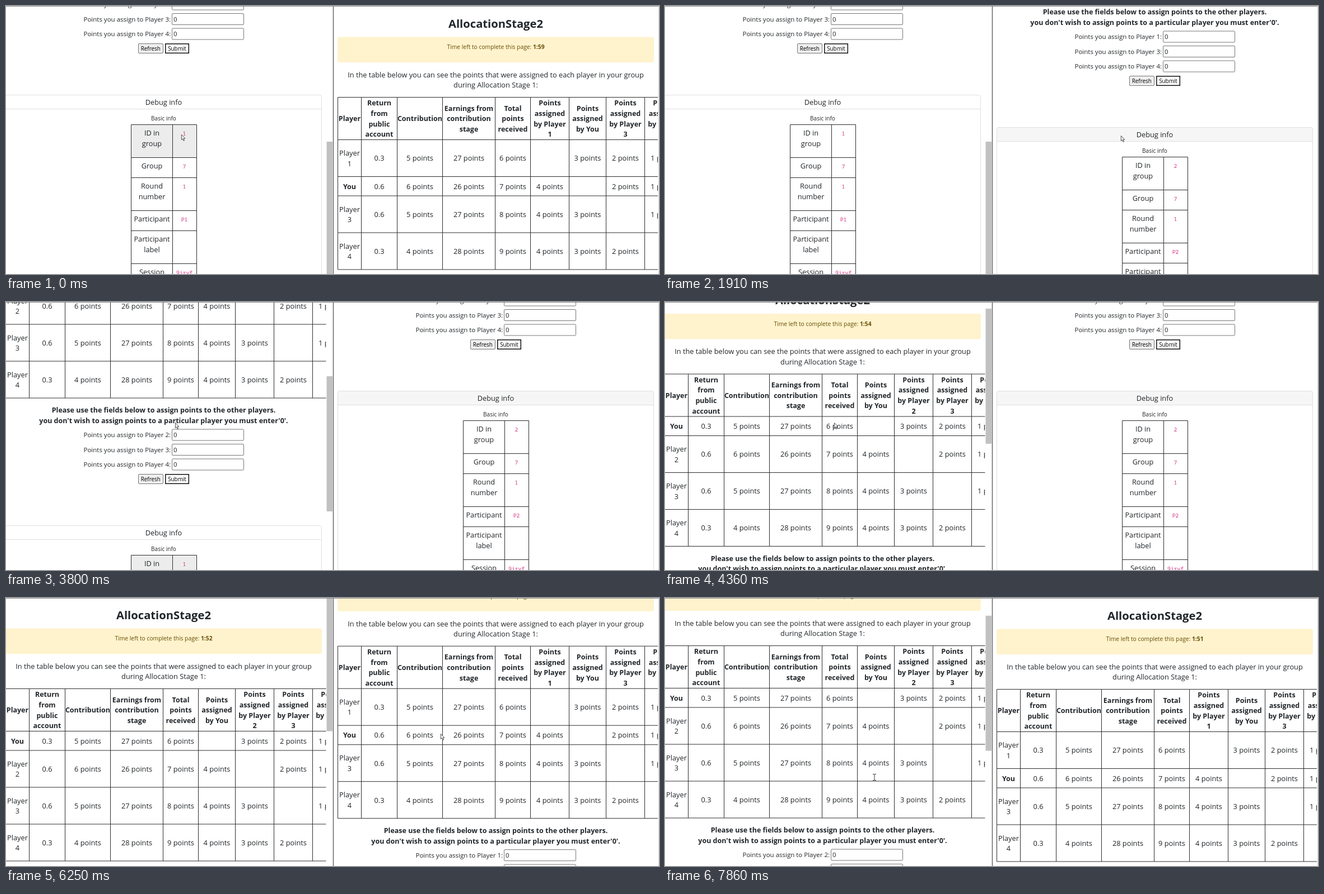
Animation, 1166 px wide and 480 px high, one loop 7.99 s. Source, as an HTML page:

```html
<!DOCTYPE html>
<html lang="en">
<head>
<meta charset="utf-8">
<title>Allocation stage</title>
<style>
  html, body { margin: 0; width: 100%; height: 100%; overflow: hidden; background: #fff; }
  svg { display: block; }
  text { font-family: "Open Sans", "Noto Sans", sans-serif; font-size: 12.76px; fill: #212529; text-anchor: middle; }
  .bold { font-size: 12.5px; font-weight: 700; }
  .title { font-size: 20.2px; font-weight: 700; }
  .timer { font-size: 10.3px; fill: #664d03; }
  .timer tspan { font-weight: 700; }
  .field { font-size: 11.5px; text-anchor: start; }
  .small { font-size: 10px; }
  .button { font-size: 9.9px; fill: #000; }
  .code { font-family: "Noto Sans Mono", "DejaVu Sans Mono", monospace; font-size: 9.7px; fill: #d63384; }
  .grid { stroke: #2e2e2e; fill: none; }
  .card { stroke: #dfdfdf; fill: none; }
  .input { stroke: #767676; fill: #fff; }
</style>
</head>
<body>
<svg id="stage" width="1166" height="480" viewBox="0 0 1166 480">
  <defs>
    <clipPath id="clipLeft"><rect width="571.5" height="480"/></clipPath>
    <clipPath id="clipRight"><rect x="587" width="577" height="480"/></clipPath>
  </defs>
</svg>
<script>
const NS = 'http://www.w3.org/2000/svg';
const stage = document.getElementById('stage');
const LOOP = 7990, STEP = 135.4;

function el(tag, attrs, parent) {
  const node = document.createElementNS(NS, tag);
  for (const k in attrs) node.setAttribute(k, attrs[k]);
  return parent.appendChild(node);
}

const SIZES = { '': 12.76, bold: 12.5, title: 20.2, timer: 10.3, field: 11.5, small: 10, button: 9.9, code: 9.7 };

// Text whose capitals are centred on y.
function label(parent, x, y, str, cls = '') {
  const node = el('text', { x, y: y + SIZES[cls] * 0.38, class: cls }, parent);
  node.textContent = str;
  return node;
}

// Several lines centred as a block on y.
function block(parent, x, y, str, cls) {
  const lines = str.split('|');
  lines.forEach((s, i) => label(parent, x, y + (i - (lines.length - 1) / 2) * 18.6, s, cls));
}

function box(parent, x, y, width, height, attrs) {
  return el('rect', { x, y, width, height, ...attrs }, parent);
}

function drawGrid(parent, xs, ys) {
  const x0 = xs[0], x1 = xs[xs.length - 1], y0 = ys[0], y1 = ys[ys.length - 1];
  const d = xs.map(x => `M${x} ${y0}V${y1}`).join('') + ys.map(y => `M${x0} ${y}H${x1}`).join('');
  el('path', { d, class: 'grid' }, parent);
}

function drawResults(g, me) {
  const players = [1, 2, 3, 4];
  const xs = [-0.5, 41.5, 105.5, 186.5, 280.5, 343.5, me === 1 ? 409.5 : 412.5, 478.5, 547.5, 616.5];
  const mid = i => (xs[i] + xs[i + 1]) / 2;
  const heads = ['Player', 'Return|from|public|account', 'Contribution', 'Earnings from|contribution|stage',
    'Total|points|received',
    ...players.map(p => 'Points|assigned|by ' + (p === me ? 'You' : `Player|${p}`))];
  heads.forEach((h, i) => block(g, mid(i), 201.5, h, 'bold'));

  const given = [5, 6, 5, 4];
  const ys = [163.5, 239.5];
  let y = 239.5;
  players.forEach(p => {
    const own = p === me, h = own ? 34.5 : 66, cy = y + h / 2;
    block(g, mid(0), cy, own ? 'You' : `Player|${p}`, own ? 'bold' : '');
    const spent = given[p - 1];
    const cells = [p % 3 === 1 ? '0.3' : '0.6', `${spent} points`, `${32 - spent} points`, `${5 + p} points`,
      ...players.map(q => q === p ? '' : `${5 - q} points`)];
    cells.forEach((c, i) => label(g, mid(i + 1), cy, c));
    ys.push(y += h);
  });
  drawGrid(g, xs, ys);
}

function drawForm(g, me) {
  label(g, 281.5, 493.5, 'Please use the fields below to assign points to the other players.', 'bold');
  label(g, 281.5, 512.2, "you don't wish to assign points to a particular player you must enter'0'.", 'bold');
  [1, 2, 3, 4].filter(p => p !== me).forEach((p, i) => {
    const y = 538 + i * 26.5;
    label(g, 138.5, y, `Points you assign to Player ${p}:`, 'field');
    box(g, 296.5, y - 10, 128, 20, { class: 'input', rx: 1.5 });
    label(g, 299, y, '0', 'field');
  });
  box(g, 236.5, 608.5, 44, 17, { fill: '#efefef', stroke: '#767676', rx: 1.5 });
  label(g, 258.3, 617, 'Refresh', 'button');
  box(g, 284.8, 608.8, 41.5, 16.5, { fill: '#fff', stroke: '#111', 'stroke-width': 1.5 });
  label(g, 305.5, 617, 'Submit', 'button');
}

function drawDebug(g, me) {
  const head = box(g, -0.5, 700.5, 564, 25, { fill: '#fff' });
  box(g, -0.5, 700.5, 564, 700, { class: 'card', rx: 3 });
  el('path', { d: 'M-.5 725.5H563.5', class: 'card' }, g);
  label(g, 281.5, 713, 'Debug info');
  label(g, 281.5, 742, 'Basic info', 'small');

  const hover = box(g, 223.5, 753.5, 116.5, 59, { fill: '#ececec' });
  const rows = [['ID in|group', me], ['Group', 7], ['Round|number', 1], ['Participant', 'P' + me],
    ['Participant|label', ''], ['Session', '9jrvf']];
  const ys = [753.5];
  let y = 753.5;
  rows.forEach(([name, value]) => {
    const lines = name.split('|');
    lines.forEach((s, i) => label(g, 260.5, y + 14.8 + i * 18.6, s));
    label(g, 318.5, y + 15.8, value, 'code');
    ys.push(y += lines.length > 1 ? 59 : 36);
  });
  drawGrid(g, [223.5, 297.5, 340.5], ys);
  return { head, hover };
}

function makePanel(me, dx, clip) {
  const outer = el('g', { 'clip-path': `url(#${clip})` }, stage);
  const g = el('g', {}, outer);
  label(g, 281.5, 31, 'AllocationStage2', 'title');
  box(g, -1, 55.5, 565, 45.5, { fill: '#fff3cd', rx: 3 });
  const timer = label(g, 281.5, 73.3, 'Time left to complete this page: ', 'timer');
  const clock = el('tspan', {}, timer);
  block(g, 281.5, 132.3, 'In the table below you can see the points that were assigned to each player in your group|during Allocation Stage 1:');
  drawResults(g, me);
  drawForm(g, me);
  const { head, hover } = drawDebug(g, me);
  return { g, dx, clock, head, hover };
}

const left = makePanel(1, 0, 'clipLeft');
const right = makePanel(2, 593, 'clipRight');

// Window frame and scrollbar
const thumb = box(stage, 572.5, 0, 10.5, 242, { fill: '#c1c1c1' });
box(stage, 583, 0, 3, 480, { fill: '#d4d4d4' });
box(stage, 584, 0, 1, 480, { fill: '#6c6c6c' });
box(stage, 0, 0, 1166, 1, { fill: '#8a8a8a' });
box(stage, 1165, 0, 1, 480, { fill: '#d8d8d8' });

const arrow = el('path', {
  d: 'M.4 .5V9.6L2.5 7.7L4 11.4L5.5 10.8L4 7.2H6.8Z',
  fill: '#fff', stroke: '#222', 'stroke-width': 0.8
}, stage);
const beam = el('path', { d: 'M-3 -5.5H-.8L0 -5L.8 -5.5H3M0 -5V5M-3 5.5H-.8L0 5L.8 5.5H3', fill: 'none', stroke: '#333' }, stage);

// Keys: [step, value, ...]
const leftScroll = [[0, 541], [24, 541], [28, 300], [32, 34.5], [33, 1], [54, 1], [58, 78]];
const rightScroll = [[0, 0], [4, 0], [9, 309], [11, 309], [15, 541], [36, 541], [42, 77.3], [46, 77.3], [48, 0]];
const pointer = [[0, 313, 230], [4, 814, 232], [15, 814, 232], [18, 820, 230], [19, 820, 230], [20, 797, 215],
  [23, 302, 216], [32, 302, 216], [35, 776, 243], [49, 776, 243], [52, 374, 281], [53, 374, 281], [55, 374, 321]];

function at(keys, n) {
  const i = keys.findIndex(k => k[0] > n);
  if (i < 0) return keys[keys.length - 1].slice(1);
  const a = keys[i - 1], b = keys[i], f = (n - a[0]) / (b[0] - a[0]);
  return a.slice(1).map((v, j) => v + (b[j + 1] - v) * f);
}

const show = (node, on) => node.setAttribute('visibility', on ? 'visible' : 'hidden');
const move = (node, x, y) => node.setAttribute('transform', `translate(${x} ${y})`);

function render(n) {
  const [ls] = at(leftScroll, n), [rs] = at(rightScroll, n), [x, y] = at(pointer, n);
  move(left.g, left.dx, -ls);
  move(right.g, right.dx, -rs);
  thumb.setAttribute('y', ls * 0.4564 - 3.9);

  const secs = 119 - Math.floor((n * STEP + 800) / 1000);
  const clock = `${Math.floor(secs / 60)}:${String(secs % 60).padStart(2, '0')}`;
  left.clock.textContent = right.clock.textContent = clock;

  show(left.hover, n < 1 || (n >= 23 && n < 33));
  show(right.hover, n >= 16 && n <= 20);
  right.head.setAttribute('fill', n >= 11 ? '#f6f6f6' : '#fff');

  show(arrow, n < 52);
  show(beam, n >= 52);
  move(n < 52 ? arrow : beam, x, y);
}

const start = performance.now();
function tick() {
  const t = (performance.now() - start) % LOOP;
  render(Math.floor((t + 10) / STEP));
  requestAnimationFrame(tick);
}
tick();
</script>
</body>
</html>
```
